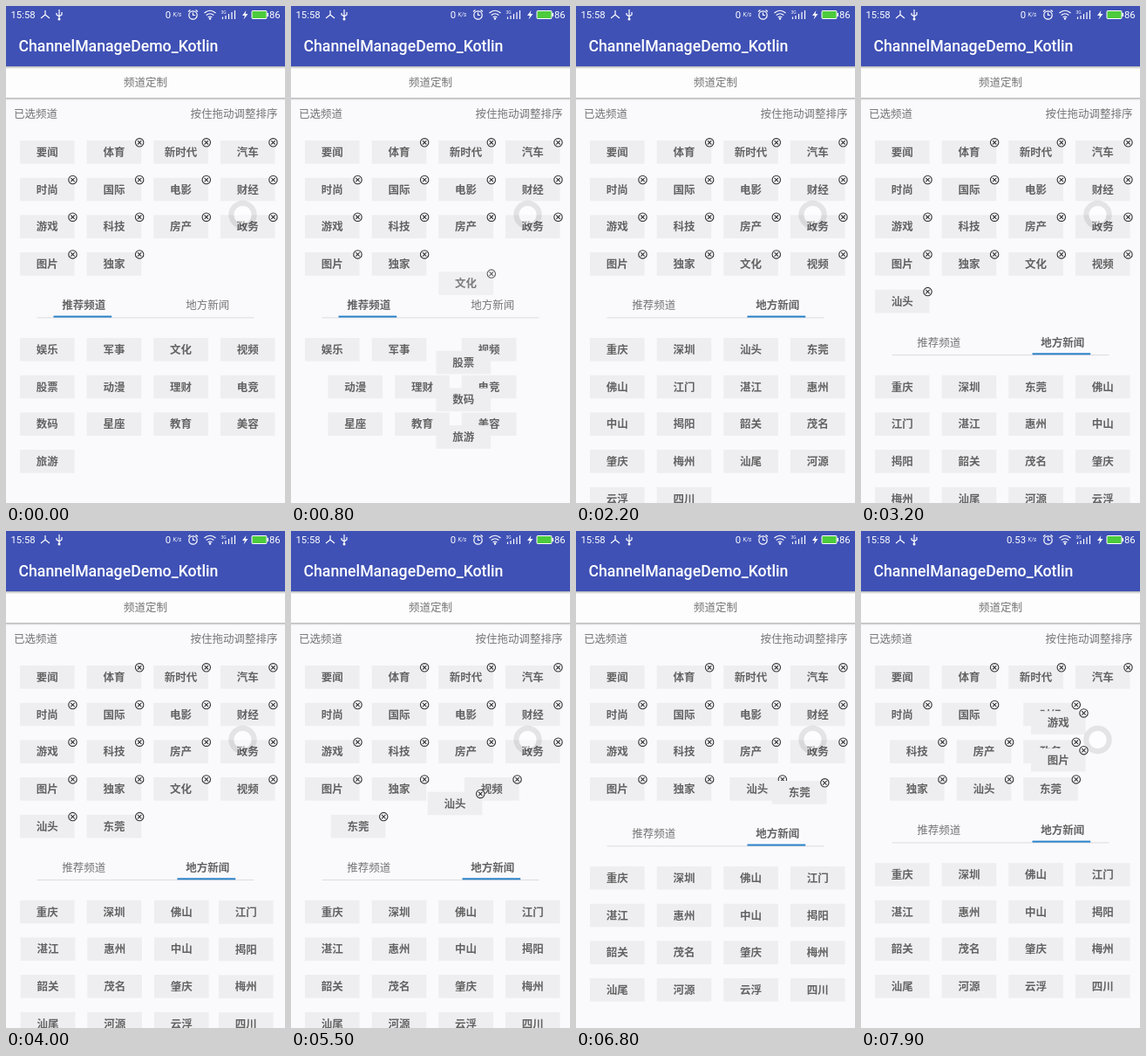
An HTML page for the animation above (8000 ms loop, 320 by 569 pixels).

```html
<!DOCTYPE html>
<html lang="zh-CN">
<head>
<meta charset="utf-8">
<style>
html, body { margin: 0; width: 100%; height: 100%; overflow: hidden; background: #faf9fc; }
svg { display: block; width: 100vw; height: 100vh; }
text { font: 12.5px "Noto Sans CJK SC", "Noto Sans CJK", "Noto Sans CJK JP", sans-serif; fill: #757575; }
.mid { text-anchor: middle; }
.end { text-anchor: end; }
.bold { font-weight: 700; fill: #636363; }
.bar text { font: 11.3px Roboto, sans-serif; fill: #fff; }
.bar .title { font-size: 17.7px; font-weight: 500; }
.bar .tiny { font-size: 6.5px; font-style: italic; }
.line { fill: none; stroke: #fff; stroke-width: 1.2; }
</style>
</head>
<body>
<svg viewBox="0 0 320 569" preserveAspectRatio="none">
  <defs>
    <linearGradient id="shade" x2="0" y2="1">
      <stop stop-color="#000" stop-opacity=".3"/><stop offset="1" stop-color="#000" stop-opacity="0"/>
    </linearGradient>
    <g id="close">
      <circle r="4.7" fill="#faf9fc" stroke="#333" stroke-width="1.1"/>
      <path d="M-2.2-2.2 2.2 2.2M2.2-2.2-2.2 2.2" stroke="#333" stroke-width="1.1"/>
    </g>
  </defs>
  <rect width="320" height="569" fill="#faf9fc"/>
  <rect y="69" width="320" height="36" fill="#fdfdfe"/>
  <rect y="69" width="320" height="3" fill="url(#shade)"/>
  <rect y="105" width="320" height="3" fill="url(#shade)"/>
  <text class="mid" x="160" y="92">频道定制</text>
  <text x="9" y="127.5">已选频道</text>
  <text class="end" x="311.5" y="127.5">按住拖动调整排序</text>
  <g id="list"></g>
  <circle cx="271.5" cy="239" r="10" fill="#fff" opacity=".5"/>
  <circle cx="271.5" cy="239" r="13.2" fill="none" stroke="#000" stroke-opacity=".09" stroke-width="6"/>
  <g class="bar">
    <rect width="320" height="69" fill="#3f51b5"/>
    <text x="5.5" y="14">15:58</text>
    <path class="line" d="M45 5V10L40 14M45 10 50 14" stroke-width="1.5"/>
    <path class="line" d="M61 4V15M58 8V10L61 12 64 10V7"/>
    <circle cx="61" cy="15" r="1.5" fill="#fff"/>
    <text class="end" id="speed" x="189" y="14"></text>
    <text class="tiny" x="191.5" y="11.5">K/s</text>
    <circle class="line" cx="214.5" cy="10.5" r="4.7"/>
    <path class="line" d="M214.5 7.5V10.5H217M209 6.5 211.5 4.5M217.5 4.5 220 6.5"/>
    <path class="line" d="M227.5 8Q234 2.500 240.500 8M229.700 10.500Q234 7 238.300 10.500M231.700 13Q234 11 236.300 13" stroke-width="1.5"/>
    <circle cx="234" cy="14.5" r="1.2" fill="#fff"/>
    <text x="246.500" y="8.500" style="font-size:5px">3G</text>
    <path class="line" d="M248.500 15V12.500M252 15V11M255.500 15V9M259 15V7M262.500 15V5" stroke-width="1.8"/>
    <path d="M275.500 5 271 11H274L272.500 15.500 277.500 9H274.500Z" fill="#fff"/>
    <rect x="282" y="5.500" width="17" height="9" rx="1" fill="#4ccb3c" stroke="#fff"/>
    <rect x="299.500" y="8" width="1.500" height="4" fill="#fff"/>
    <text x="302" y="14">86</text>
    <text class="title" x="14.500" y="52">ChannelManageDemo_Kotlin</text>
  </g>
</svg>
<script>
const LOOP = 8000, MOVE = 250, LAG = 21, FLY = 300, FLY_LEAD = 459;
const COL = 76.65, ROW = 42.7, TOP = 167.3;
const words = s => s.split(' ');
const list = document.getElementById('list'), speed = document.getElementById('speed');

const first = {
  t: -LOOP, tab: 0,
  sel: words('要闻 体育 新时代 汽车 时尚 国际 电影 财经 游戏 科技 房产 政务 图片 独家'),
  rec: words('娱乐 军事 文化 视频 股票 动漫 理财 电竞 数码 星座 教育 美容 旅游')
};
const local = words('重庆 深圳 汕头 东莞 佛山 江门 湛江 惠州 中山 揭阳 韶关 茂名 肇庆 梅州 汕尾 河源 云浮 四川');

const events = [
  { t: 630, add: '文化' },
  { t: 1378, add: '视频' },
  { t: 2180, tab: 1 },
  { t: 2885, add: '汕头' },
  { t: 3745, add: '东莞' },
  { t: 5358, del: '文化' },
  { t: 6600, del: '视频' },
  { t: 7729, del: '电影' }
];

// Each scene is the layout that holds after one event.
const scenes = [first];
for (const e of events) {
  const last = scenes[scenes.length - 1];
  const next = { ...last, add: null, ...e };
  if (e.add) {
    next.sel = [...last.sel, e.add];
    next.rec = last.rec.filter(n => n !== e.add);
  }
  if (e.del) next.sel = last.sel.filter(n => n !== e.del);
  if (e.tab) next.rec = local;
  scenes.push(next);
}

const clamp = x => Math.min(1, Math.max(0, x));
const ease = x => 0.5 - Math.cos(Math.PI * clamp(x)) / 2;
const mix = (a, b, p) => a + (b - a) * p;
const rows = names => Math.ceil(names.length / 4);
const slot = (i, top) => [47.3 + COL * (i % 4), top + ROW * Math.floor(i / 4)];
const header = s => TOP + ROW * rows(s.sel) + 4;
const footer = s => header(s) + 51.2 + ROW * rows(s.rec) + 6.5;

function place(s, name) {
  const i = s.sel.indexOf(name);
  if (i >= 0) return slot(i, TOP);
  const j = s.rec.indexOf(name);
  return j < 0 ? null : slot(j, header(s) + 51.2);
}

function tile(name, [x, y], icon, body = 1) {
  return `<g transform="translate(${x.toFixed(2)} ${y.toFixed(2)})">
    <g opacity="${body}"><rect x="-31.3" y="-13.3" width="62.6" height="26.6" fill="#eeedf0"/>
    <text class="mid bold" y="4.7">${name}</text></g>
    ${icon ? `<use href="#close" x="29.2" y="-11" opacity="${icon}"/>` : ''}</g>`;
}

function tabs(y, active) {
  const label = (name, x, i) =>
    `<text class="mid ${i === active ? 'bold' : ''}" x="${x}" y="4.7">${name}</text>`;
  return `<g transform="translate(0 ${y.toFixed(2)})">
    <rect x="35.5" y="14.3" width="249" height="1" fill="#dcdcde"/>
    <rect x="${active ? 196.5 : 54.5}" y="12.5" width="66.7" height="2" fill="#2a82c8"/>
    ${label('推荐频道', 89.3, 0)}${label('地方新闻', 231.3, 1)}</g>`;
}

function more(y) {
  return `<rect x="9" y="${y}" width="302.500" height="31" fill="#b4b4b5"/>
    <text class="mid" x="155" y="${y + 20}" style="fill:#666">更多地方频道</text>`;
}

function draw(t) {
  let k = scenes.length - 1;
  while (scenes[k].t > t) k--;
  const now = scenes[k], old = scenes[Math.max(0, k - 1)], next = scenes[k + 1];
  const lead = ease((t - now.t) / MOVE);
  const p = now.tab !== old.tab ? 1 : ease((t - now.t - (now.add ? LAG : 0)) / MOVE);

  const at = name => {
    const b = place(now, name), a = place(old, name) || b;
    const q = name === now.add ? lead : p;
    return [mix(a[0], b[0], q), mix(a[1], b[1], q)];
  };
  const y = mix(header(old), header(now), p);
  const leaving = next && next.del && t >= next.t - FLY_LEAD ? next.del : null;

  let out = tabs(y, now.tab);
  if (now.tab) out += more(mix(footer(now.tab === old.tab ? old : now), footer(now), p));
  for (const n of now.rec) out += tile(n, at(n), 0);
  now.sel.forEach((n, i) => {
    if (n === leaving) return;
    // An added tile cross-fades into its closable form.
    if (n === now.add) out += tile(n, at(n), lead, 1 - lead * (1 - lead));
    else out += tile(n, at(n), i ? 1 : 0);
  });
  if (leaving) {
    const f = (t - next.t + FLY_LEAD) / FLY, a = at(leaving);
    if (f < 1) out += tile(leaving, [mix(a[0], 85.3, f), mix(a[1], y - 8, f)], 1);
  }
  list.innerHTML = out;
  speed.textContent = t < 7500 ? '0' : '0.53';
}

const start = performance.now();
function tick() {
  draw((performance.now() - start) % LOOP);
  requestAnimationFrame(tick);
}
tick();
</script>
</body>
</html>
```
